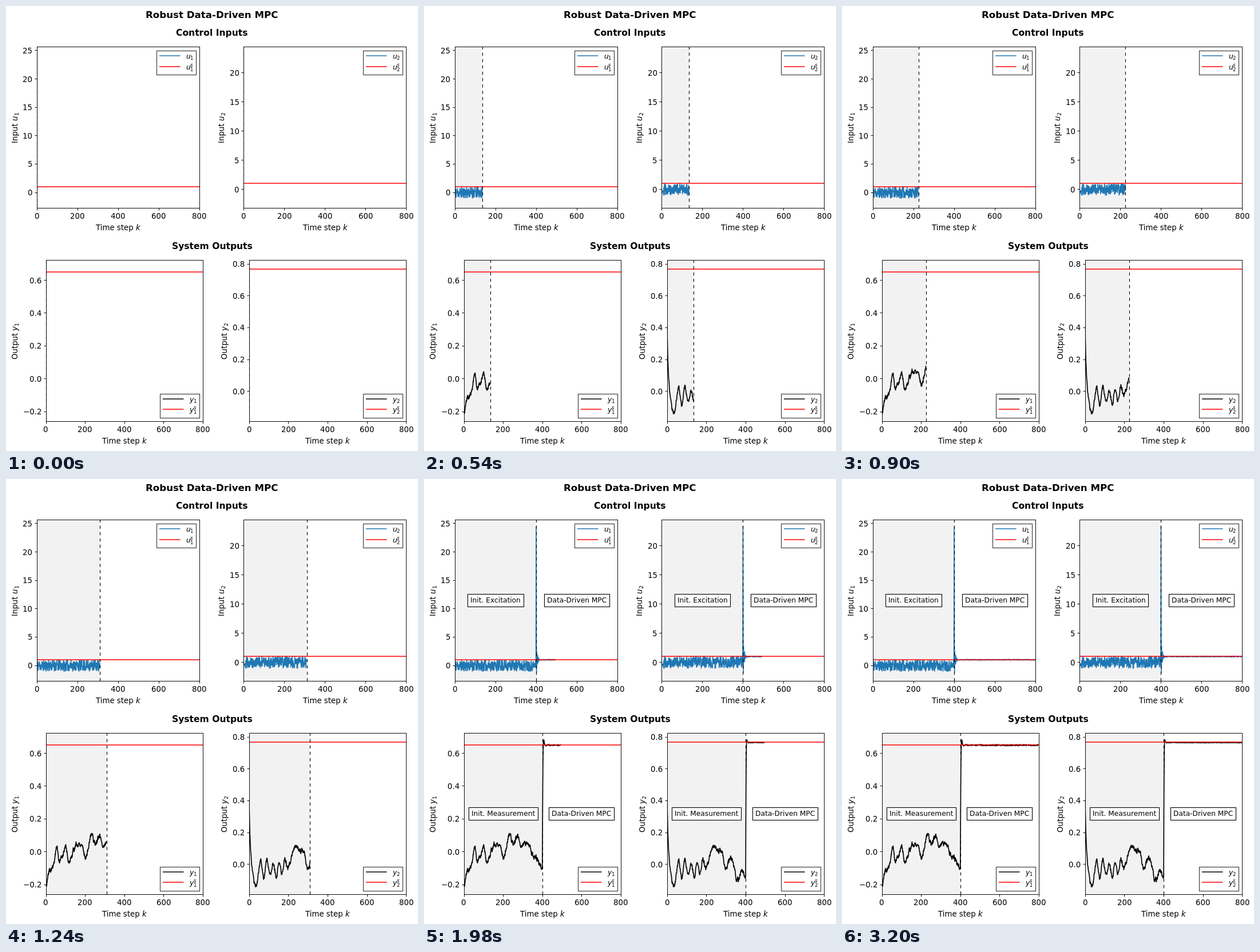
An HTML page with a canvas that plays this animation: 720x778 px, repeating every 3.22 s.

```html
<!DOCTYPE html>
<html lang="en">
<head>
<meta charset="utf-8">
<title>Robust Data-Driven MPC</title>
<style>
html, body { margin: 0; width: 100%; height: 100%; overflow: hidden; background: #fff; }
canvas { display: block; }
</style>
</head>
<body>
<canvas id="stage" width="720" height="778"></canvas>
<script>
const ctx = document.getElementById('stage').getContext('2d');
const LOOP = 3220, FRAME = 20, STEPS_PER_FRAME = 5;
const TOTAL = 800, INIT = 400, LABEL_FROM = 355;
const BLUE = '#1f77b4', RED = '#ff0000', BLACK = '#000';
const THIN = 0.95, EDGE = 1.11, CURVE = 1.67;

const font = (size, style = '') => `${style} ${size}px "DejaVu Sans", sans-serif`;
const crisp = v => Math.round(v) + 0.5;

function random(seed) {
  return () => {
    seed = (seed + 0x6D2B79F5) | 0;
    let t = Math.imul(seed ^ (seed >>> 15), 1 | seed);
    t = (t + Math.imul(t ^ (t >>> 7), 61 | t)) ^ t;
    return ((t ^ (t >>> 14)) >>> 0) / 2147483648 - 1;   // -1 .. 1
  };
}

// Random excitation, one control spike, then a damped ringing.
function inputSeries({ seed, spike, ring, base, noise }) {
  const rnd = random(seed);
  return Array.from({ length: TOTAL }, (_, k) => {
    const r = rnd(), i = k - INIT;
    if (i < 0) return r;
    if (i === 0) return spike;
    return base - ring * Math.exp(-i / 5) * Math.cos(2.6 * (i - 2)) + noise * r;
  });
}

// Smooth drift through turning points plus correlated noise, then a step response.
function outputSeries({ seed, turns, start, base, lag, noise }) {
  const rnd = random(seed);
  let j = 0, drift = 0, last = 0;
  return Array.from({ length: TOTAL }, (_, k) => {
    const r = rnd(), i = k - INIT;
    if (i >= 0) return base + (last - base) * Math.exp(-i / lag) * Math.cos(0.35 * i) + noise * r;
    while (j < turns.length - 2 && turns[j + 1][0] <= k) j++;
    const [k0, v0] = turns[j], [k1, v1] = turns[j + 1];
    const ease = (1 - Math.cos(Math.PI * (k - k0) / (k1 - k0))) / 2;
    drift = k && 0.7 * drift + 0.013 * r;
    return last = v0 + (v1 - v0) * ease + start * Math.exp(-k / 6) + drift;
  });
}

const turns1 = [[0, -0.21], [20, -0.11], [38, -0.09], [56, 0.03], [70, -0.06], [103, 0.03], [116, -0.06],
  [155, 0.04], [182, 0.05], [203, -0.03], [235, 0.11], [249, 0.05], [275, 0.09], [291, 0.04],
  [320, 0.06], [365, -0.04], [400, -0.1]];
const turns2 = [[0, 0], [35, -0.13], [60, 0.02], [74, -0.09], [89, 0.03], [109, -0.07], [122, 0.02],
  [139, -0.08], [154, 0.03], [165, -0.06], [182, 0.04], [196, -0.02], [233, 0.11], [278, 0.08],
  [297, -0.03], [324, 0.03], [361, -0.1], [377, -0.04], [400, -0.08]];

const input = { w: 284, top: 71.5, bottom: 353.5, name: 'Input ', sym: 'u', color: BLUE,
  init: 'Init. Excitation', gap: 5, digits: 0, goal: 1, legendY: 78.2 };
const output = { w: 274.55, top: 444.5, bottom: 726.5, name: 'Output ', sym: 'y', color: BLACK,
  init: 'Init. Measurement', gap: 0.2, digits: 1, legendY: 677.9 };

const panels = [
  { ...input, n: '1', x0: 54, zero: 326.2, unit: 9.93, low: 0, high: 25, labelX: 20,
    data: inputSeries({ seed: 11, spike: 24.4, ring: 3.3, base: 1.03, noise: 0.08 }) },
  { ...input, n: '2', x0: 415.48, zero: 320.6, unit: 10.2, low: 0, high: 20, labelX: 381,
    data: inputSeries({ seed: 29, spike: 23.3, ring: 4, base: 1, noise: 0.08 }) },
  { ...output, n: '1', x0: 69.55, zero: 651.7, unit: 286.8, low: -0.2, high: 0.6, labelX: 20, goal: 0.65,
    data: outputSeries({ seed: 5, turns: turns1, start: 0, base: 0.65, lag: 2.5, noise: 0.004 }) },
  { ...output, n: '2', x0: 424.85, zero: 673.9, unit: 278.3, low: 0, high: 0.8, labelX: 386, goal: 0.77,
    data: outputSeries({ seed: 17, turns: turns2, start: 0.41, base: 0.766, lag: 1.8, noise: 0.0025 }) }
];

function line(x1, y1, x2, y2, color, width) {
  ctx.strokeStyle = color;
  ctx.lineWidth = width;
  ctx.beginPath();
  ctx.moveTo(x1, y1);
  ctx.lineTo(x2, y2);
  ctx.stroke();
}

function frame(left, top, right, bottom, color) {
  ctx.fillStyle = '#fff';
  ctx.fillRect(left, top, right - left, bottom - top);
  ctx.strokeStyle = color;
  ctx.lineWidth = EDGE;
  ctx.strokeRect(left, top, right - left, bottom - top);
}

function width(str, f) {
  ctx.font = f;
  return ctx.measureText(str).width;
}

// Text on whole pixels; align is the share of the width left of x.
function text(str, x, y, f, align = 0.5) {
  const left = Math.round(x - width(str, f) * align);
  ctx.fillStyle = BLACK;
  ctx.fillText(str, left, Math.round(y));
}

// Runs of [string, font, baseline shift], centred on x.
function runs(parts, x, y) {
  x -= parts.reduce((sum, [s, f]) => sum + width(s, f), 0) / 2;
  for (const [s, f, dy = 0] of parts) {
    text(s, x, y + dy, f, 0);
    x += width(s, f);
  }
}

function boxed(str, x, y) {
  const f = font(12.22), half = width(str, f) / 2 + 4.89;
  frame(crisp(x - half), crisp(y - 11.1), crisp(x + half), crisp(y + 10.9), BLACK);
  text(str, x, y + 3.4, f);
}

function legend(p) {
  const right = crisp(p.x0 + p.w - 6.1), left = right - 69;
  const top = crisp(p.legendY), tx = left + 51;
  frame(left, top, right, top + 42, '#333');
  const main = font(12.22, 'italic'), small = font(8.55);
  const sub = tx + width(p.sym, main);
  const row = (dy, color) => {
    const y = Math.round(p.legendY + dy);
    line(left + 4.5, y, left + 41, y, color, CURVE);
    text(p.sym, tx, y + 4.5, main, 0);
    return y;
  };
  text(p.n, sub, row(9, p.color) + 7, small, 0);
  const y = row(27.5, RED);
  text('s', sub, y, font(8.55, 'italic'), 0);
  text(p.n, sub, y + 8, small, 0);
}

function axes(p) {
  const left = crisp(p.x0), right = crisp(p.x0 + p.w);
  ctx.strokeStyle = BLACK;
  ctx.lineWidth = THIN;
  ctx.strokeRect(left, p.top, right - left, p.bottom - p.top);
  for (let k = 0; k <= TOTAL; k += 200) {
    const x = p.x0 + p.w * k / TOTAL;
    line(crisp(x), p.bottom, crisp(x), p.bottom + 4, BLACK, THIN);
    text(String(k), x, p.bottom + 18, font(13.33));
  }
  for (let i = Math.round(p.low / p.gap); i <= Math.round(p.high / p.gap); i++) {
    const y = p.zero - i * p.gap * p.unit;
    line(left, crisp(y - 0.5), left - 4, crisp(y - 0.5), BLACK, THIN);
    text((i * p.gap).toFixed(p.digits).replace('-', '\u2212'), p.x0 - 7.6, y + 4.9, font(13.33), 1);
  }
  const plain = font(13.33), italic = font(13.33, 'italic');
  runs([['Time step ', plain], ['k', italic]], p.x0 + p.w / 2, p.bottom + 38.7);
  ctx.save();
  ctx.translate(p.labelX, Math.round((p.top + p.bottom) / 2));
  ctx.rotate(-Math.PI / 2);
  runs([[p.name, plain], [p.sym, italic], [p.n, font(9.33), 2]], 0, 0);
  ctx.restore();
}

function panel(p, step) {
  const px = k => p.x0 + p.w * k / TOTAL;
  const edge = px(Math.min(step, INIT));
  const midY = (p.top + p.bottom) / 2;

  ctx.save();
  ctx.beginPath();
  ctx.rect(p.x0, p.top, p.w, p.bottom - p.top);
  ctx.clip();
  ctx.fillStyle = '#f2f2f2';
  ctx.fillRect(p.x0, p.top, edge - p.x0, p.bottom - p.top);

  if (step > 0) {
    ctx.strokeStyle = p.color;
    ctx.lineWidth = CURVE;
    ctx.lineJoin = 'round';
    ctx.beginPath();
    for (let k = 0; k <= step && k < TOTAL; k++) ctx.lineTo(px(k), p.zero - p.data[k] * p.unit);
    ctx.stroke();
  }
  const goalY = Math.round(p.zero - p.goal * p.unit);
  line(p.x0, goalY, p.x0 + p.w, goalY, RED, CURVE);

  ctx.setLineDash([5.55, 5.55]);
  line(crisp(edge), p.bottom, crisp(edge), p.top, BLACK, EDGE);
  ctx.restore();

  axes(p);
  if (step >= LABEL_FROM) boxed(p.init, px(Math.min(step, INIT) / 2), midY);
  if (step >= INIT) boxed('Data-Driven MPC', px((INIT + TOTAL) / 2), midY);
  legend(p);
}

function draw(now) {
  const step = Math.floor((now % LOOP) / FRAME) * STEPS_PER_FRAME;
  ctx.fillStyle = '#fff';
  ctx.fillRect(0, 0, 720, 778);
  text('Robust Data-Driven MPC', 360, 21, font(16.67, 'bold'));
  text('Control Inputs', 360, 52, font(15.56, 'bold'));
  text('System Outputs', 360, 425, font(15.56, 'bold'));
  for (const p of panels) panel(p, step);
  requestAnimationFrame(draw);
}
requestAnimationFrame(draw);
</script>
</body>
</html>
```
